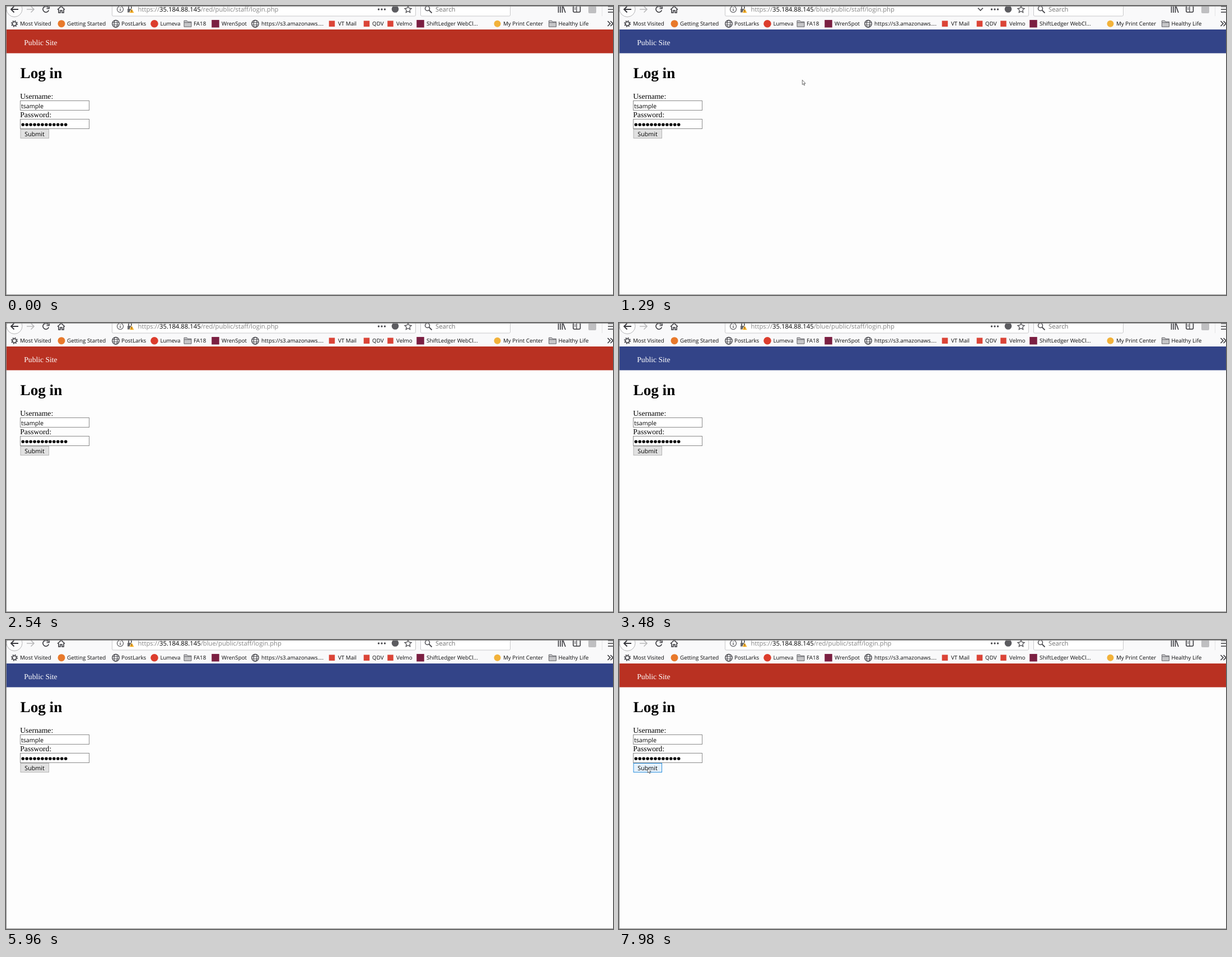
Recreate the animation shown at these times as an HTML page. Size 1084 px wide and 517 px high, loop 8000 ms.

```html
<!DOCTYPE html>
<html lang="en">
<head>
<meta charset="utf-8">
<title>Log in</title>
<style>
  html, body { margin: 0; width: 100%; height: 100%; overflow: hidden; background: #fdfdfd; }
  svg { display: block; width: 1084px; height: 517px; text-rendering: geometricPrecision; }
  .ui { font-family: "Open Sans", "Noto Sans", sans-serif; font-size: 11.3px; }
  .mark { font-size: 9.8px; fill: #0c0c0d; }
  .form { font-size: 10.7px; }
  .page { font-family: "Liberation Serif", serif; font-size: 13.6px; }
  .dim { fill: #858585; }
  .selected tspan { fill: #fff; }
  .line { fill: none; stroke: #38383d; stroke-width: 1.6; }
  .thin { fill: none; stroke: #4a4a4f; stroke-width: 1.1; }
</style>
</head>
<body>
<svg viewBox="0 0 1084 517">
  <rect width="1084" height="517" fill="#fdfdfd"/>
  <rect width="1084" height="42" fill="#f9f9fa"/>

  <!-- toolbar -->
  <g class="line">
    <circle cx="15" cy="5.5" r="14" fill="#fdfdfd" stroke="#b4b4b6" stroke-width="1"/>
    <path d="M22 6H9M14.5 .5 9 6l5.500 5.500" stroke-width="1.900"/>
    <path d="M37 6h13M44.500 .5 50 6l-5.500 5.500" stroke="#b9b9bb"/>
    <path id="reload" d="M75.300 2.500A5.300 5.300 0 1 0 76.300 7.500M77 0v4.500h-4.500"/>
    <path id="stop" d="M66 1l10 10M76 1 66 11"/>
    <path d="M92 6.500 98.500 .5l6.500 6M94 6v6h3V8h3v4h3V6"/>
  </g>
  <rect id="bar" x="189.500" y="-8" width="542" height="26" rx="2" fill="#fff"/>
  <rect x="740.500" y="-8" width="160" height="26" rx="2" fill="#fff" stroke="#c8c8ca"/>
  <g class="thin">
    <circle cx="204" cy="6" r="5.500"/>
    <path d="M204 5v4M204 2.500v1.300" stroke-width="1.300"/>
    <path d="M219 5V2.500a2.500 2.500 0 0 1 5 0V5" stroke-width="1.600"/>
    <rect x="217" y="5" width="8" height="6.500" fill="#6a6a6e" stroke="none"/>
    <path d="M224.500 4.500 229 12.500h-9z" fill="#ffb52b" stroke="#fff" stroke-width=".6"/>
    <path d="M224.500 7v3M224.500 10.700v.8" stroke="#7a5200"/>
    <path d="M718 .2l1.800 3.800 4.200.5-3.100 2.900.8 4.200-3.700-2.100-3.700 2.100.8-4.200-3.100-2.900 4.200-.5z" stroke-width="1.300"/>
    <path id="chevron" d="M641 3.500l4.500 4.500 4.500-4.500" stroke-width="1.700"/>
    <circle cx="752.500" cy="4.500" r="4" stroke-width="1.500"/>
    <path d="M755.500 7.500l5 5" stroke-width="1.800"/>
  </g>
  <g fill="#4a4a4f">
    <circle cx="665.500" cy="6" r="1.700"/><circle cx="671" cy="6" r="1.700"/><circle cx="676.500" cy="6" r="1.700"/>
    <circle cx="695" cy="5.500" r="6.300" fill="#5c5c60"/>
  </g>
  <g class="line">
    <path d="M986.500 0v12M990 0v12M993.500 0v12M995 1l4 11"/>
    <rect x="1013" y="0" width="12.500" height="11" rx="2"/>
    <path d="M1019 0v11M1015 3.500h2.500M1015 6h2.500" stroke-width="1.200"/>
    <path d="M1075 1h9M1075 6h9M1075 11h9"/>
    <path d="M1064.500 0v18" stroke="#e2e2e4" stroke-width="1"/>
    <path d="M1074.500 27l4.500 4.500-4.500 4.500M1079.500 27l4.500 4.500-4.500 4.500"/>
  </g>
  <rect x="1040" y="0" width="14" height="13" rx="2" fill="#bfbfc1"/>
  <rect id="selection" x="235" y="0" height="13.500" fill="#0078d7"/>
  <text id="url" class="ui" x="235.500" y="10.300"><tspan class="dim">https://</tspan><tspan>35.184.88.145</tspan><tspan id="path" class="dim"></tspan></text>
  <text class="ui" x="767" y="10.300" fill="#737373">Search</text>
  <g id="bookmarks"></g>

  <!-- page -->
  <rect id="band" y="42" width="1084" height="42.500"/>
  <g class="page">
    <text x="32.300" y="69.500" fill="#fff">Public Site</text>
    <text x="25.500" y="129" font-size="27.200" font-weight="bold">Log in</text>
    <text x="25.300" y="166">Username:</text>
    <text x="25.300" y="199.300">Password:</text>
  </g>
  <rect id="user" x="25.500" y="169.500" width="123" height="17" fill="#fff"/>
  <rect id="pass" x="25.500" y="202.500" width="123" height="17" fill="#fff"/>
  <text class="ui form" x="27" y="182.500">tsample</text>
  <g id="dots"></g>
  <rect id="submit" x="26" y="220.500" width="50.500" height="16"/>
  <text class="ui form" x="33.300" y="233">Submit</text>

  <path d="M0 .5H1084M.5 0V517M0 516.500H1084" fill="none" stroke="#8c8c8c"/>
  <g id="cursor">
    <path id="arrow" d="M.3 .3V8.600L2.200 7l1.300 3 1.300-.6L3.500 6.500H6Z" fill="#fff" stroke="#333" stroke-width=".7"/>
    <path id="beam" d="M1 .5h4M3 .5v8M1 8.500h4" fill="none" stroke="#333" stroke-width=".9"/>
  </g>
</svg>
<script>
const LOOP = 8000;
const $ = id => document.getElementById(id);
const set = (id, attrs) => { for (const k in attrs) $(id).setAttribute(k, attrs[k]); };
const show = (id, on) => { $(id).style.display = on ? '' : 'none'; };

// Bookmark icons, drawn around their centre
const square = (color, s) => `<rect x="${-s / 2}" y="${-s / 2}" width="${s}" height="${s}" fill="${color}"/>`;
const disc = (color, r) => `<circle r="${r}" fill="${color}"/>`;
const icons = {
  gear: '<circle r="3.500" class="line"/><circle r="5.200" class="line" stroke-dasharray="2 2.084"/>',
  globe: '<g class="thin"><circle r="6.300" stroke-width="1.400"/><ellipse rx="2.800" ry="6.300"/><path d="M-6 -2H6M-6 2H6"/></g>',
  folder: '<path d="M-6.500 5.500v-11h5l1.500 2h6.500v9zM-6.500 -2h13" fill="#c6c6c8" stroke="#66666a"/>',
  orange: disc('#e8792b', 6.5),
  red: disc('#dc3d2d', 6.8),
  maroon: square('#7b1f42', 13.5),
  mail: square('#db4437', 10.5),
  yellow: disc('#f2b23a', 6)
};
const bookmarks = [
  ['gear', 15, 25, 'Most Visited'], ['orange', 99, 109, 'Getting Started'],
  ['globe', 196, 206, 'PostLarks'], ['red', 265, 275.5, 'Lumeva'],
  ['folder', 324.5, 335, 'FA18'], ['maroon', 374, 385, 'WrenSpot'],
  ['globe', 445, 456, 'https://s3.amazonaws....'], ['mail', 582, 593, 'VT Mail'],
  ['mail', 644, 654, 'QDV'], ['mail', 686.5, 697, 'Velmo'],
  ['maroon', 740, 751, 'ShiftLedger WebCl...'], ['yellow', 877.5, 888, 'My Print Center'],
  ['folder', 976, 986.5, 'Healthy Life']
];
$('bookmarks').innerHTML = bookmarks.map(([icon, cx, x, label]) =>
  `<g transform="translate(${cx} 31.7)">${icons[icon]}</g><text class="ui mark" x="${x}" y="35.3">${label}</text>`).join('');
$('dots').innerHTML = Array.from({ length: 12 }, (_, i) =>
  `<circle cx="${30.2 + 6.95 * i}" cy="212.3" r="2.75"/>`).join('');

// Each track holds [start time, value...]; values change in hard steps
const tracks = {
  site: [[0, 'red'], [270, 'blue'], [2540, 'red'], [3480, 'blue'], [6360, 'red']],
  bar: [[0, 'idle'], [270, 'focus'], [1290, 'idle'], [1830, 'hover'], [2030, 'idle']],
  chevron: [[0, 0], [270, 1], [1440, 0.6], [1560, 0.3], [1690, 0], [1830, 0.5], [2030, 0]],
  field: [[0, ''], [4860, 'user'], [4980, 'pass'], [5130, '']],
  button: [[0, 'idle'], [5130, 'hover'], [5960, 'idle'], [7050, 'hover'], [7860, 'press'], [7980, 'hover']],
  cursor: [
    [0, ''], [870, 'arrow', 371, 54], [1020, 'arrow', 327, 126], [1160, 'arrow', 327, 132],
    [1440, 'arrow', 345, 110], [1560, 'arrow', 365, 75], [1690, 'arrow', 372, 51],
    [1830, 'beam', 374, 8], [2030, ''],
    [3870, 'beam', 384, 6], [4060, 'arrow', 310, 58], [4190, 'arrow', 165, 130], [4320, 'arrow', 95, 168],
    [4860, 'beam', 88, 177], [4980, 'beam', 78, 210], [5130, 'arrow', 69, 224], [5250, 'arrow', 66, 225], [5810, ''],
    [6490, 'arrow', 376, 99], [6730, 'arrow', 126, 231], [6870, 'arrow', 82, 229], [7050, 'arrow', 51, 229]
  ]
};
const at = (name, t) => tracks[name].filter(step => step[0] <= t).pop().slice(1);

const bandColor = { red: '#b93122', blue: '#334488' };
const barColor = { idle: '#c8c8ca', hover: '#a0a0a3', focus: '#2f8fe0' };
const buttonColor = { idle: ['#e1e1e1', '#b5b5b5'], hover: ['#e5f1fb', '#2b8fdd'], press: ['#cce4f7', '#005499'] };

function draw(t) {
  const [site] = at('site', t), [bar] = at('bar', t), [field] = at('field', t), [button] = at('button', t);
  const [shape, x, y] = at('cursor', t);
  const focused = bar === 'focus', loading = button === 'press';

  set('band', { fill: bandColor[site] });
  set('bar', { stroke: barColor[bar] });
  $('path').textContent = `/${site}/public/staff/login.php`;
  $('url').classList.toggle('selected', focused);
  show('selection', focused);
  if (focused) set('selection', { width: $('url').getComputedTextLength() + 0.5 });
  set('chevron', { opacity: at('chevron', t)[0] });
  show('reload', !loading);
  show('stop', loading);

  for (const id of ['user', 'pass']) set(id, { stroke: field === id ? '#171717' : '#8a8a8a' });
  const [fill, stroke] = buttonColor[button];
  set('submit', { fill, stroke });

  show('arrow', shape === 'arrow');
  show('beam', shape === 'beam');
  if (shape) set('cursor', { transform: `translate(${x} ${y})` });
}

const start = performance.now();
function tick() {
  draw((performance.now() - start) % LOOP);
  requestAnimationFrame(tick);
}
tick();
</script>
</body>
</html>
```
